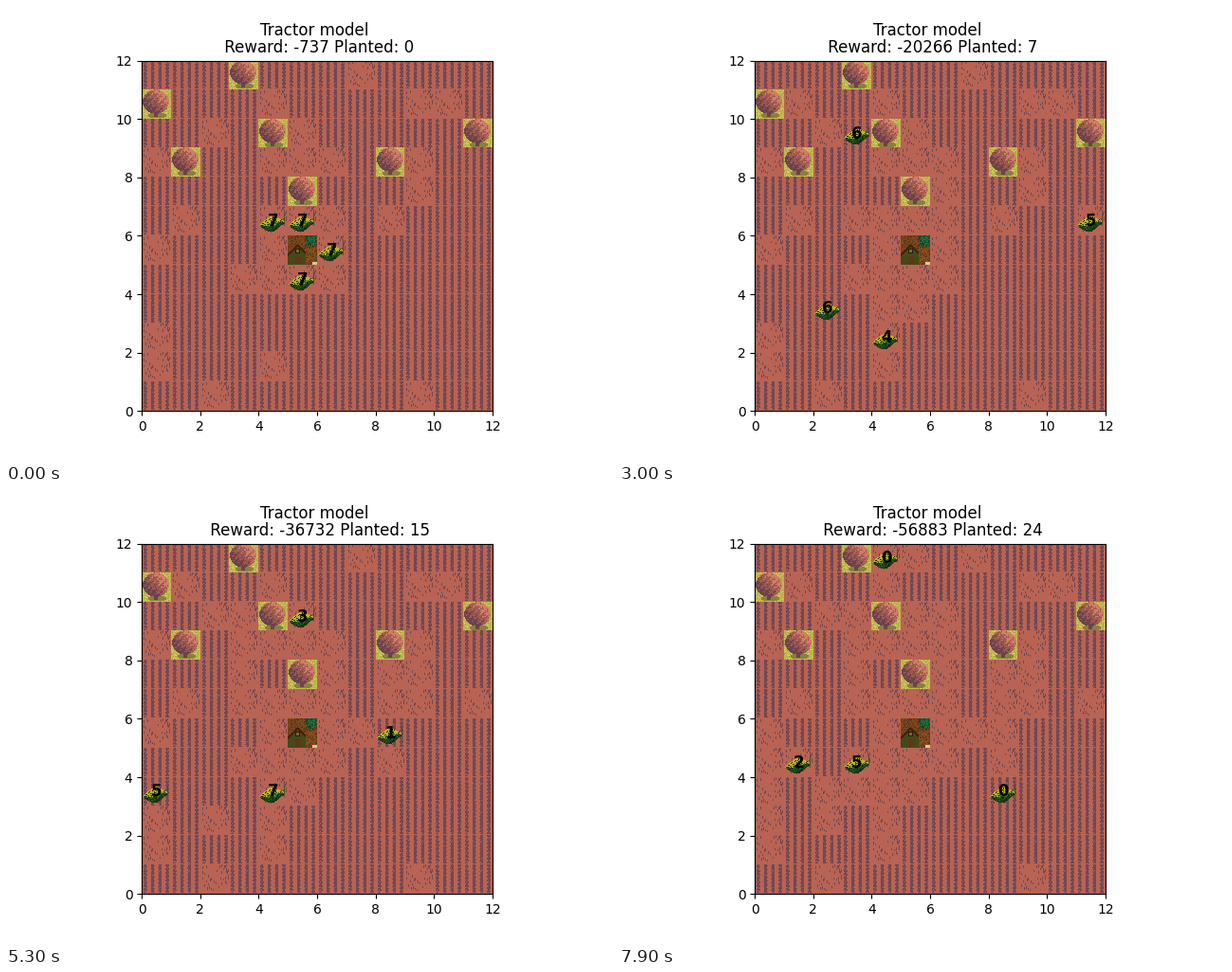
These frames come from a looping animation (640x480 px, 8 s). A matplotlib script:

```python
import random

import numpy as np
import matplotlib.pyplot as plt
from matplotlib.animation import FuncAnimation

FRAMES, N, S = 80, 12, 31          # frames, field size in cells, pixels per cell
rng = np.random.default_rng(7)
walk = random.Random(4)
Y, X = np.mgrid[0:S, 0:S]

SOIL, DARK = (184, 99, 83), (114, 72, 82)


# --- tiles and sprites ---

def tile(color):
    return np.full((S, S, 3), color, np.uint8)


def speckle(share):
    return rng.random((S, S)) < share


def box(img, x0, y0, x1, y1, color):
    img[y0:y1, x0:x1] = color


def furrows():
    img = tile(SOIL)
    phase = (X + 0.5) % (S / 4)
    tooth = (Y + 2 * (X // 8)) % 4 / 2
    img[np.abs(phase - 3.9) < 1.2 + 0.6 * tooth] = DARK
    img[speckle(0.06)] = SOIL
    img[-1] = SOIL
    return img


def planted():
    img = tile(SOIL)
    for _ in range(38):
        x, y = rng.integers(1, S - 1), rng.integers(0, S - 4)
        box(img, x, y, x + 1, y + rng.integers(2, 4), DARK)
    return img


def tree():
    img = tile((193, 186, 78))
    img[speckle(0.16)] = (160, 160, 62)
    img[speckle(0.07)] = (222, 214, 104)
    img[((X - 16) / 10) ** 2 + ((Y - 27) / 3) ** 2 < 1] = (136, 128, 62)
    box(img, 13, 23, 17, 29, (112, 66, 66))
    crown = ((X - 14.5) / 13.8) ** 2 + ((Y - 12.5) / 12.8) ** 2 < 1
    light = (X - 14.5) * 0.6 - (Y - 12.5) * 0.6 + rng.uniform(-4, 4, (S, S))
    light += 2.5 * np.sin((X + Y) * 0.9)
    img[crown] = (158, 90, 80)
    img[crown & (light < -4)] = (108, 66, 78)
    img[crown & (light > 5)] = (208, 126, 102)
    return img


def house():
    img = tile((122, 72, 28))
    img[speckle(0.25)] = (88, 50, 22)
    left = X < 19
    gable = Y - 10 - np.abs(X - 10)
    img[left & (gable > 0)] = (66, 74, 28)
    img[left & (np.abs(gable) < 1.5)] = (62, 36, 16)
    box(img, 8, 14, 13, 19, (40, 28, 14))
    box(img, 9, 15, 12, 18, (140, 98, 42))
    box(img, 8, 22, 14, 30, (96, 54, 20))
    box(img, 19, 11, 29, 28, (134, 80, 28))
    box(img, 20, 0, 30, 10, (28, 112, 62))
    img[~left & (Y < 12) & speckle(0.4)] = (22, 66, 40)
    img[~left & (Y > 10) & speckle(0.25)] = (156, 52, 30)
    img[~left & (Y > 10) & speckle(0.2)] = (72, 62, 26)
    box(img, 26, 28, S, S, (226, 200, 140))
    return img


def tractor():
    img = np.zeros((S, S, 4), np.uint8)
    u = (X - 14) / 14
    bow = np.clip(1 - np.abs(u) ** 1.4, 0, 1)
    top, bottom = 18 - 2 * u - 8 * bow, 18 - 2 * u + 9 * bow
    depth = (Y - top) / np.maximum(bottom - top, 0.1)
    body = (depth > 0) & (depth < 1)
    shade = depth + 0.15 * u + rng.uniform(-0.2, 0.2, (S, S))
    img[body] = (44, 104, 32, 255)
    img[body & (shade < 0.46)] = (188, 178, 38, 255)
    img[body & (shade > 0.68)] = (28, 60, 26, 255)
    img[body & speckle(0.14)] = (24, 32, 18, 255)
    img[(np.abs(X - 27) < 1) & (Y > 8) & (Y < 19)] = (62, 82, 34, 255)
    return img


FURROW, PLANTED, TREE, HOUSE, TRACTOR = furrows(), planted(), tree(), house(), tractor()

# --- field and routes ---

# planted columns of each row, bottom row first
OPEN = [(2, 9), (0, 4), (0,), (), (3, 4, 5, 6), (0, 4, 6), (1, 4, 5, 6, 8),
        (9,), (0, 4, 5, 6, 9), (2, 5), (4, 9, 10), (7,)]
TREES = [(0, 10), (3, 11), (4, 9), (1, 8), (8, 8), (11, 9), (5, 7)]
HOME = (5, 5)

# each leg lists the cells to sow, then where the leg ends
LEG_ENDS = [0, 12, 23, 37, 53, 66, 79]
REWARDS = [-737, -8430, -15725, -24807, -36732, -46736, -56883]
ROUTES = [
    [[(5, 6)], [(5, 9)], [(2, 9)], [(1, 10), (3, 9), (3, 8), (3, 7), (3, 7)],
     [(5, 9)], [(6, 9), (5, 11), (4, 11)], [(4, 11), (4, 11)]],
    [[(6, 5)], [(6, 6)], [(6, 7), (10, 5)], [(11, 6), (9, 6), (9, 6)],
     [(8, 7), (7, 5), (8, 4), (8, 5)], [(8, 5), (7, 3)], [(8, 3)]],
    [[(4, 6)], [(3, 6), (4, 4)], [(2, 5)], [(2, 2), (2, 2)],
     [(0, 3)], [(0, 3), (0, 4)], [(0, 4), (1, 4), (1, 4)]],
    [[(5, 4)], [(5, 3), (5, 3)], [(4, 3), (4, 1)], [(4, 2), (4, 3)],
     [(4, 5), (4, 3)], [(3, 3), (2, 3)], [(2, 3), (3, 4)]],
]


def neighbours(x, y):
    cells = [(x + 1, y), (x - 1, y), (x, y + 1), (x, y - 1)]
    return [c for c in cells if min(c) >= 0 and max(c) < N
            and c not in TREES and c != HOME]


def distances(goal):
    """Steps to the goal from every free cell."""
    dist, queue = {goal: 0}, [goal]
    for cell in queue:
        for c in neighbours(*cell):
            if c not in dist:
                dist[c] = dist[cell] + 1
                queue.append(c)
    return dist


def wander(cell, goal, steps):
    """Random walk that roams near the goal and arrives exactly on time."""
    dist, path = distances(goal), []
    for left in range(steps - 1, -1, -1):
        reach = min(left, max(dist[cell], 1))
        cell = walk.choice([c for c in [cell, *neighbours(*cell)] if dist[c] <= reach])
        path.append(cell)
    return path


def drive(route):
    """Return (cell, seeds) for every frame and the sowing events."""
    cell, seeds = route[0][0], 7
    states, sown = [(cell, seeds)], []
    for leg, start, end in zip(route[1:], LEG_ENDS, LEG_ENDS[1:]):
        hops = [distances(b)[a] + 1 for a, b in zip([cell, *leg], leg)]
        times = np.rint(start + (end - start) * np.cumsum(hops) / sum(hops)).astype(int)
        for k, (stop, t) in enumerate(zip(leg, times), 1):
            path = wander(cell, stop, t - len(states) + 1)
            states += [(c, seeds) for c in path]
            cell = stop
            if k < len(leg):
                if np.hypot(stop[0] - HOME[0], stop[1] - HOME[1]) == 1:
                    seeds = 7          # refill beside the house
                else:
                    seeds -= 1
                    sown.append((t, stop))
                states[-1] = (cell, seeds)
    return states, sown


runs = [drive(r) for r in ROUTES]
tracks = [states for states, _ in runs]
events = sorted(e for _, sown in runs for e in sown)


def put(field, cell, img):
    x, r = cell[0] * S, (N - 1 - cell[1]) * S
    field[r:r + S, x:x + S] = img


base = np.tile(FURROW, (N, N, 1))
for row, cols in enumerate(OPEN):
    for col in cols:
        put(base, (col, row), PLANTED)
for cell in TREES:
    put(base, cell, TREE)
put(base, HOME, HOUSE)

# --- figure ---

fig, ax = plt.subplots(figsize=(6.4, 4.8), dpi=100)
ground = ax.imshow(base, extent=(0, N, 0, N), interpolation="nearest")
movers = [ax.imshow(TRACTOR, extent=(0, 1, 0, 1), interpolation="nearest", zorder=1)
          for _ in tracks]
labels = [ax.text(0, 0, "", size=12, weight="bold", ha="center", va="center")
          for _ in tracks]
ticks = range(0, N + 1, 2)
ax.set(xlim=(0, N), ylim=(0, N), xticks=ticks, yticks=ticks)
title = ax.set_title("", linespacing=1.0)


def update(i):
    done = [cell for t, cell in events if t <= i]
    field = base.copy()
    for cell in done:
        put(field, cell, PLANTED)
    ground.set_data(field)
    for img, label, track in zip(movers, labels, tracks):
        (x, y), seeds = track[i]
        img.set_extent((x, x + 1, y, y + 1))
        label.set_position((x + 0.5, y + 0.5))
        label.set_text(str(seeds))
    ax.set(xlim=(0, N), ylim=(0, N))
    reward = round(np.interp(i, LEG_ENDS, REWARDS))
    title.set_text(f"Tractor model \n Reward: {reward} Planted: {len(done)}")
    return [ground, title, *movers, *labels]


anim = FuncAnimation(fig, update, frames=FRAMES, interval=100, repeat=True,
                     repeat_delay=0, blit=False)
plt.show()
```
